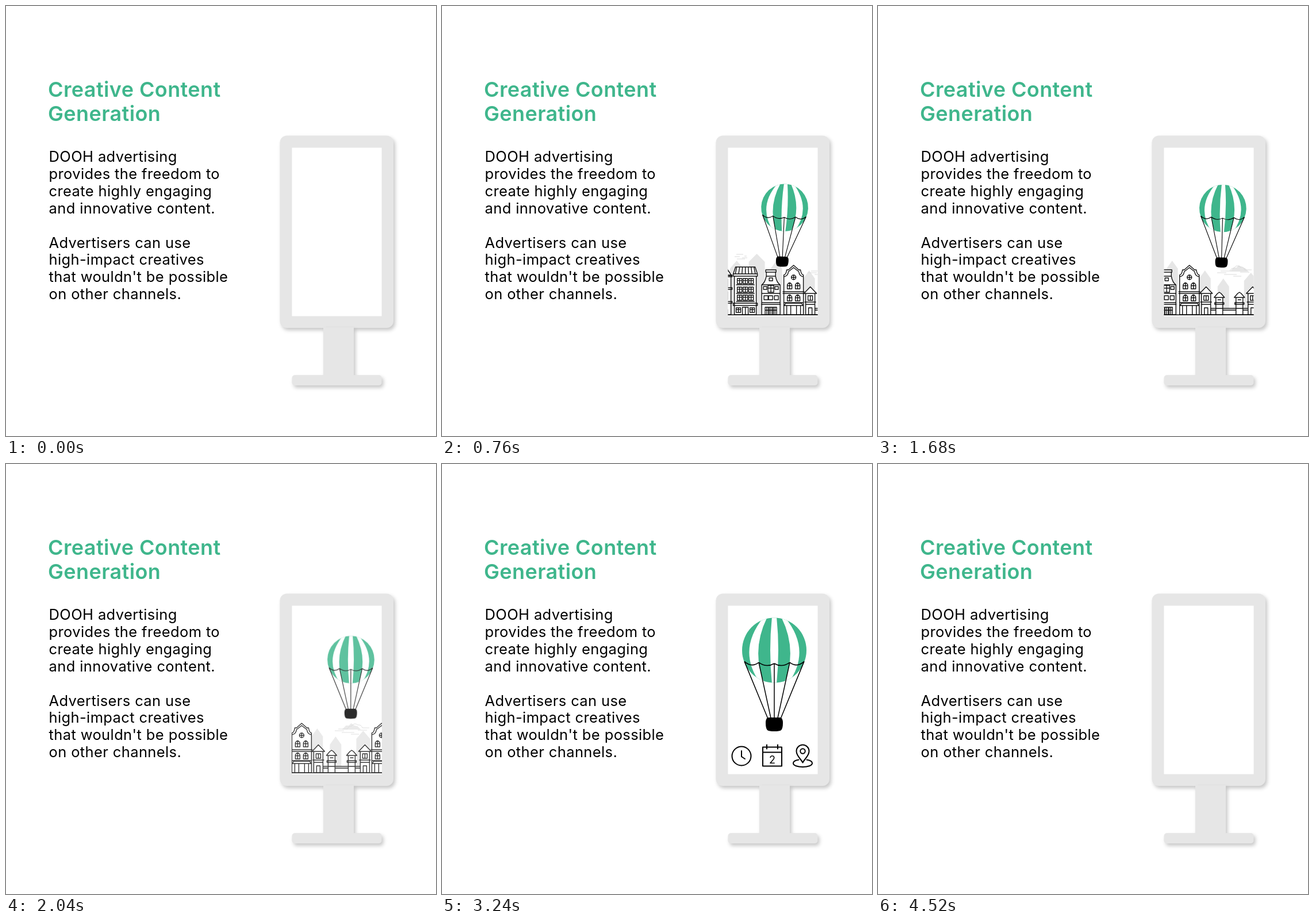
Write an HTML page that moves like this. It is 748 px wide and 748 px high and loops after 5 s.

```html
<!DOCTYPE html>
<html lang="en">
<head>
<meta charset="utf-8">
<title>Creative Content Generation</title>
<style>
html, body { margin: 0; width: 100%; height: 100%; overflow: hidden; background: #fff; }
svg { display: block; width: 100vw; height: 100vh; }
text { font-family: Inter, "Open Sans", sans-serif; }
.title { font-size: 36px; font-weight: 600; letter-spacing: .4px; fill: #3fb68c; }
.body { font-size: 25.5px; letter-spacing: .38px; fill: #000; }
.sign { fill: #e6e6e6; filter: drop-shadow(3px 4px 3px rgba(0, 0, 0, .22)); }
.house { fill: #fff; stroke: #111; stroke-width: 1.4; stroke-linejoin: round; }
.far { fill: #e6e6e6; }
.cloud { fill: none; stroke: #d6d6d6; stroke-width: .9; }
.rope { fill: none; stroke: #000; stroke-width: 1.5; }
.icon { fill: none; stroke: #000; stroke-width: 2; stroke-linecap: round; stroke-linejoin: round; }
.icon text { font-size: 18px; fill: #000; stroke: none; text-anchor: middle; }
</style>
</head>
<body>
<svg viewBox="0 0 748 748">
  <defs>
    <clipPath id="screen"><rect x="497.5" y="247" width="156" height="292"/></clipPath>
    <clipPath id="dome"><ellipse rx="56" ry="56.5"/></clipPath>
    <g id="balloon">
      <g clip-path="url(#dome)">
        <rect x="-57" y="-57" width="114" height="114" fill="#3fb68c"/>
        <g id="gores" fill="#fff"></g>
      </g>
      <path id="ropes" class="rope"/>
      <path d="M-11 117H11Q15 119 15 126Q15 136 12 139Q9 141 0 141Q-9 141 -12 139Q-15 136 -15 126Q-15 119 -11 117Z"/>
    </g>
  </defs>

  <g id="copy"></g>

  <rect class="sign" x="476.5" y="225.5" width="197.5" height="334.5" rx="12"/>
  <g class="sign">
    <rect x="552" y="559" width="53" height="88"/>
    <rect x="497.5" y="642" width="156" height="18" rx="5"/>
  </g>
  <rect x="497.5" y="246.5" width="156" height="293" fill="#fff"/>

  <g clip-path="url(#screen)">
    <g id="flight">
      <g id="skyline" class="far"></g>
      <g id="clouds"></g>
      <g id="street"></g>
      <path d="M497 537.2H654" stroke="#111" stroke-width="1.6"/>
      <use id="flyer" href="#balloon"/>
    </g>
    <g id="finale">
      <g data-x="578" data-y="366.5"><use href="#balloon" y="-42.5"/></g>
      <g class="icon" data-x="521" data-y="508">
        <circle r="16.5"/><path d="M0 -9V1L6 5"/>
      </g>
      <g class="icon" data-x="574.5" data-y="508">
        <path d="M-16.5 -15.5H16.5V17.5H-16.5ZM-16.5 -6.5H16.5M-9.5 -19.5V-12.5M9.5 -19.5V-12.5"/>
        <text y="13">2</text>
      </g>
      <g class="icon" data-x="627.5" data-y="508">
        <path d="M0 11.5C-3 5 -11 0 -11 -8.5A11 11 0 0 1 11 -8.5C11 0 3 5 0 11.5Z"/>
        <circle cy="-8.5" r="4.2"/>
        <path d="M-7 6.5C-13 7.5 -16.5 10 -16.5 12.5C-16.5 16.5 -9 19 0 19S16.5 16.5 16.5 12.5C16.5 10 13 7.5 7 6.5"/>
      </g>
    </g>
  </g>
</svg>
<script>
const $ = id => document.getElementById(id);
const NS = 'http://www.w3.org/2000/svg';

function add(parent, tag, attrs, text) {
  const el = document.createElementNS(NS, tag);
  for (const k in attrs) el.setAttribute(k, attrs[k]);
  if (text) el.textContent = text;
  parent.append(el);
  return el;
}

// Copy
[['Creative Content', 158], ['Generation', 199.5]].forEach(([s, y]) =>
  add($('copy'), 'text', { class: 'title', x: 73, y }, s));
['DOOH advertising', 'provides the freedom to', 'create highly engaging',
 'and innovative content.', '', 'Advertisers can use', 'high-impact creatives',
 "that wouldn't be possible", 'on other channels.'].forEach((s, i) =>
  s && add($('copy'), 'text', { class: 'body', x: 74.5, y: 271 + i * 29.9 }, s));

// Balloon: white gores, scalloped band and ropes
const gore = s => `M${-18 * s} -58Q${-66 * s} 0 ${-24 * s} 58H${-17 * s}Q${-41 * s} 0 ${-12 * s} -58Z`;
add($('gores'), 'path', { d: gore(1) + gore(-1) + 'M-4 -58Q-10 0 -4 58H4Q10 0 4 -58Z' });
const knots = [-52, -27, 0, 27, 52];
const knotY = x => 23 - Math.abs(x) * .07;
$('ropes').setAttribute('d', knots.map((x, i) => {
  const n = knots[i + 1];
  const swag = n === undefined ? '' : `M${x} ${knotY(x)}Q${(x + n) / 2} 31 ${n} ${knotY(n)}`;
  return `M${x} ${knotY(x)}L${x * .22} 118` + swag;
}).join(''));

// Houses, drawn around x = 0
const box = (x, y, w, h) => `M${x} ${y}h${w}v${h}h${-w}Z`;
const pane = (x, y, w, h) => box(x, y, w, h) + `M${x + w / 2} ${y}v${h}M${x} ${y + h * .4}h${w}`;
const arch = (x, y, w, h) =>
  `M${x} ${y + h}v${4 - h}q${w / 2} -7 ${w} 0v${h - 4}ZM${x + w / 2} ${y}v${h}M${x} ${y + h * .5}h${w}`;
const row = (xs, f, y, w, h) => xs.map(x => f(x, y, w, h)).join('');

const triple = (y, h) => box(-9, y, 18, h) + `M-3 ${y}v${h}M3 ${y}v${h}M-9 ${y + 4}h18`;
const spire = 'M-16 469L0 444L16 469ZM-10.5 460H10.5M-5 452H5M0 444V469M-5 452L5 469M5 452L-5 469M-10 460L-5 469M10 460L5 469'
  + box(-15, 469, 30, 68) + box(-17, 468, 34, 3) + triple(475, 13) + box(-17, 490, 34, 3)
  + triple(497, 14) + box(-17, 514, 34, 3) + 'M-9 537V528Q0 521 9 528V537M0 525V537M-9 529H9M-5 529V537M5 529V537';

let slats = '';
for (let i = -3; i <= 3; i++) slats += `M${i * 5} 454L${i * 5.8} 466`;
const block = 'M-21 466L-17 454H17L21 466Z' + slats + box(-19, 470, 38, 67) + box(-21, 466, 42, 4)
  + [474, 489, 503].map(y => row([-14, -4, 6], pane, y, 8, 9) + `M-16 ${y + 11}h32`).join('')
  + box(-21, 517, 42, 4) + row([-16, 8], pane, 525, 8, 8) + box(-5, 524, 10, 13) + 'M0 524V537';

const gable = 'M-16 537V485Q-10 481 -8 470V463H8V470Q10 481 16 485V537Z' + box(-9, 459, 18, 4)
  + 'M-8 470H8M-16 485H16M-16 500H16M-16 516H16' + pane(-5, 486, 10, 12) + box(-3, 473, 6, 5)
  + row([-13, 7], box, 488, 6, 5) + row([-12, -4, 6], box, 504, 7, 7) + 'M-17 519H17'
  + row([-10, -3, 4], pane, 524, 6, 13);

const hall = 'M-17 537V468Q-13 467 -12 459H-9L0 451L9 459H12Q13 467 17 468V537Z'
  + 'M-17 471Q-10 470 -9 462L0 455L9 462Q10 470 17 471M-19 497H19M-19 500H19M-17 516H17'
  + 'M-4 472a4 4 0 1 0 8 0a4 4 0 1 0 -8 0M-4 472h8M0 468v8'
  + row([-11, 3], arch, 481, 8, 11) + row([-11, 3], arch, 502, 8, 11)
  + 'M-14 517H14L16 521H-16ZM-12 521V537M-5 521V537M5 521V537M12 521V537';

const cottage = box(-8, 500, 16, 37) + 'M-11 500L0 488.5L11 500Z' + box(-4, 504, 8, 8)
  + 'M0 504V512M-10 515H10M-8 519H8' + box(-3, 525, 6, 12);

const turret = box(-6, 507, 12, 30) + 'M-9 507L-3 500L0 498L3 500L9 507Z' + box(-8, 516, 16, 3)
  + 'M-3 511H3M-6 526H6';

const wall = box(-35, 526, 70, 11) + 'M-35 529H35';

[[478, gable], [708, wall], [515, spire], [555, block], [599.5, gable], [639, hall],
 [668, cottage], [691, turret], [726, turret], [749, cottage], [778, hall], [816, gable]]
  .forEach(([x, d]) => add($('street'), 'path', { class: 'house', d, transform: `translate(${x})` }));

// Grey skyline: centre, peak, half width
[[540, 443, 12], [575, 431, 14], [609, 443, 10], [666, 460, 10], [698, 474, 10],
 [746, 464, 12], [780, 452, 12]].forEach(([x, y, w]) =>
  add($('skyline'), 'path', { d: `M${x - w} 537V${y + 14}L${x} ${y}L${x + w} ${y + 14}V537Z` }));

add($('skyline'), 'path', { d: 'M-12 6L-5 -1H0L4 -5L10 -1L15 0L21 6Z', transform: 'translate(721 456)' });
const puff = 'M-30 8H-14M-24 5H-8Q-6 0 -1 0Q4 -7 10 -2Q16 -3 18 3H30M-18 11H4M10 7H26M-2 14H12';
add($('clouds'), 'path', { class: 'cloud', d: 'M-10 -3H2M-13 1H-4M0 3H9M-9 5H5M4 0H8', transform: 'translate(540 435)' });
add($('clouds'), 'path', { class: 'cloud', d: puff, transform: 'translate(684 456)' });

// Motion
const clamp = v => Math.max(0, Math.min(1, v));
const place = (el, s) => el.setAttribute('transform', s);
const pops = [...$('finale').children];

function draw(ms) {
  const t = ms / 1000;
  const flying = clamp(ms / 240) * clamp((2240 - ms) / 240);
  $('flight').setAttribute('opacity', flying);
  if (flying) {
    const shift = -76 * (t - .4);
    place($('street'), `translate(${shift})`);
    place($('skyline'), `translate(${shift})`);
    place($('clouds'), `translate(${-50 * (t - .4)})`);
    const drift = Math.exp(-3.5 * t);
    const bob = Math.cos(2 * Math.PI * (t - 1.15));
    const tilt = 19.5 * drift + .7 * (1 - bob);
    place($('flyer'), `translate(${600 - 56 * drift} ${345.5 - 6.7 * bob}) rotate(${tilt}) scale(.73)`);
  }

  const u = t - 2.56;
  $('finale').setAttribute('opacity', u < -.001 ? 0 : clamp((4520 - ms) / 240));
  const k = ms >= 3240 ? 1 : 1 - .48 * Math.exp(-8 * u) * Math.cos(24 * u);
  if (u > -.001) pops.forEach(p => place(p, `translate(${p.dataset.x} ${p.dataset.y}) scale(${k})`));
}

const start = performance.now();
function tick() {
  const ms = (performance.now() - start) % 5000;
  draw(Math.floor(ms / 40) * 40);
  requestAnimationFrame(tick);
}
draw(0);
requestAnimationFrame(tick);
</script>
</body>
</html>
```
